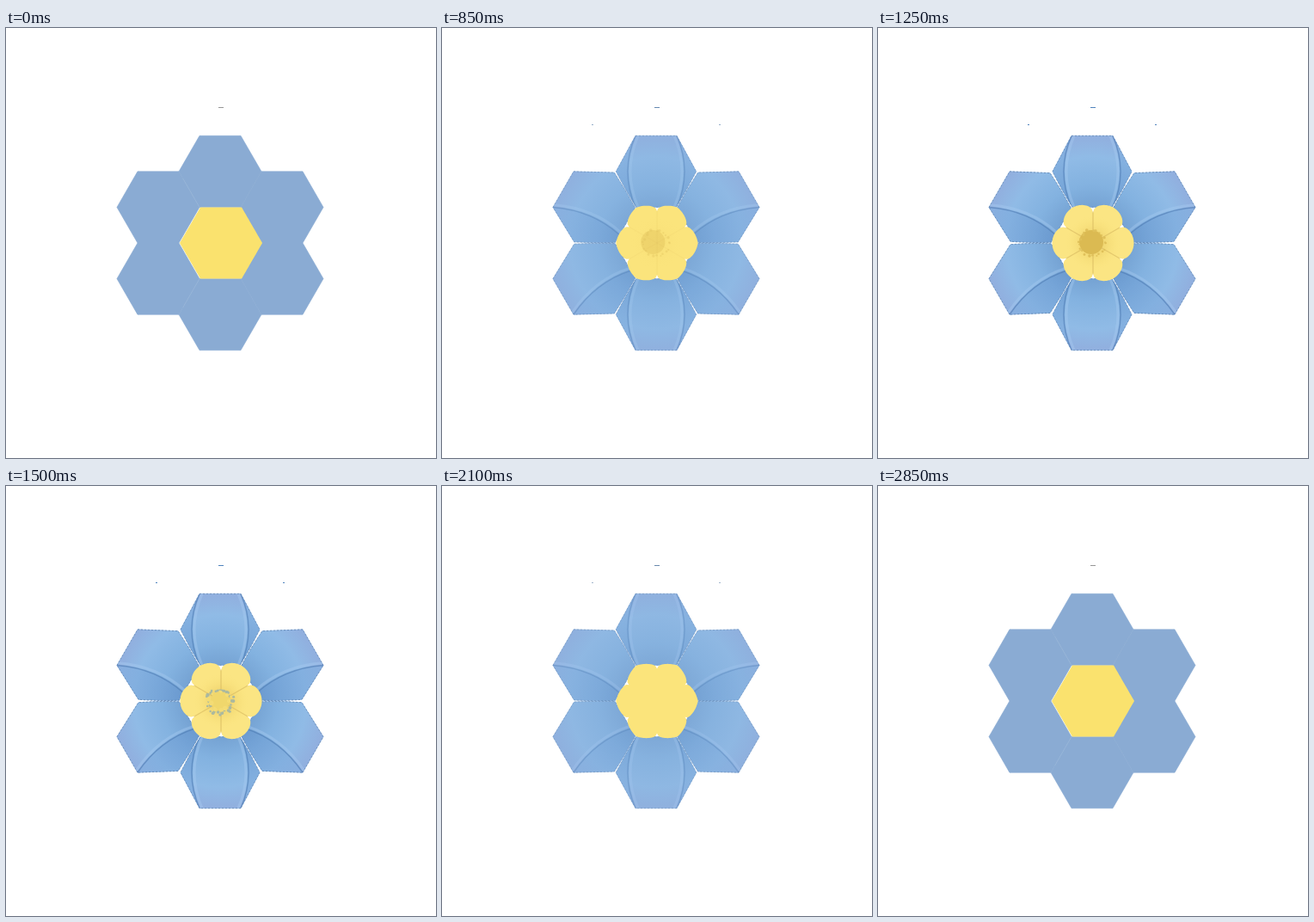
These frames come from a looping animation (500 by 500 pixels, 2.9 s). An HTML page with a canvas:

```html
<!DOCTYPE html>
<html lang="en">
<head>
<meta charset="utf-8">
<title>Hexagon flower</title>
<style>
html, body { margin: 0; width: 100%; height: 100%; overflow: hidden; background: #fff; }
canvas { display: block; }
</style>
</head>
<body>
<canvas id="c" width="500" height="500"></canvas>
<script>
const ctx = document.getElementById('c').getContext('2d');
const LOOP = 2900, STEP = 50;
const R = 48;                       // hexagon corner radius
const H = R * Math.sqrt(3) / 2;     // centre to edge
const TAU = Math.PI * 2, SIXTH = TAU / 6;

const clamp = x => Math.max(0, Math.min(1, x));
const smooth = x => x * x * (3 - 2 * x);
const ramp = (t, a, b) => smooth(clamp((t - a) / (b - a)));
const pulse = (t, a, b, c, d) => ramp(t, a, b) * (1 - ramp(t, c, d));
const mix = (a, b, p) => a + (b - a) * p;
const mixRgb = (a, b, p) => `rgb(${a.map((v, i) => Math.round(mix(v, b[i], p)))})`;

function seeded(seed) {
  return () => (seed = seed * 16807 % 2147483647) / 2147483647;
}

function radial(y, r0, r1, ...cols) {
  const g = ctx.createRadialGradient(0, y, r0, 0, y, r1);
  cols.forEach((col, i) => g.addColorStop(i / (cols.length - 1), col));
  return g;
}

function dot(x, y, r, col) {
  ctx.fillStyle = col;
  ctx.beginPath();
  ctx.arc(x, y, r, 0, TAU);
  ctx.fill();
}

// A petal points up from the flower's centre; opening pulls in its shoulders.
function petalPath(p) {
  const path = new Path2D();
  const shoulder = R - 2 * p, base = R / 2 - p;
  path.moveTo(-R / 2, -3 * H);
  path.lineTo(R / 2, -3 * H);
  path.lineTo(shoulder, -2 * H);
  path.quadraticCurveTo(R * 0.75, -1.5 * H, base, -H);
  path.lineTo(-base, -H);
  path.quadraticCurveTo(-R * 0.75, -1.5 * H, -shoulder, -2 * H);
  path.closePath();
  return path;
}

// A crease runs from an outer corner to the base; the flap beside it is darker.
function crease(side, bend, foot) {
  const line = shift => {
    const path = new Path2D();
    path.moveTo(side * (R / 2 - shift), -3 * H);
    path.quadraticCurveTo(side * (bend - shift), -2 * H, side * (foot - shift), -H);
    return path;
  };
  const flap = new Path2D(line(0));
  flap.lineTo(side * R, -H);
  flap.lineTo(side * R, -3 * H);

  ctx.fillStyle = radial(0, H, 3 * H, 'rgba(98,146,203,.6)', 'rgba(128,174,224,.5)');
  ctx.fill(flap);
  ctx.lineWidth = 3;
  ctx.strokeStyle = 'rgba(168,203,240,.4)';
  ctx.stroke(line(3));
  ctx.lineWidth = 1.5;
  ctx.strokeStyle = 'rgba(76,122,178,.6)';
  ctx.stroke(line(0));
}

function petal(turn, mirror, p) {
  const path = petalPath(p);
  const upright = turn % 3 === 0;
  ctx.save();
  ctx.scale(mirror, 1);
  ctx.rotate(-turn * SIXTH);
  ctx.fillStyle = ctx.strokeStyle = mixRgb([138, 171, 211], [141, 182, 227], p);
  ctx.lineWidth = 0.6;
  ctx.fill(path);
  ctx.stroke(path);

  ctx.save();
  ctx.clip(path);
  ctx.globalAlpha = p;
  ctx.fillStyle = radial(0, H - 6, 3 * H + 8, '#729fd0', '#83b2e0', '#90bbe6', '#91abdc');
  ctx.fillRect(-R, -3 * H, 2 * R, 2 * H);
  if (upright) {
    crease(-1, 42, R / 2);
    crease(1, 42, R / 2);
  } else {
    crease(-1, 4, 13);
  }
  ctx.restore();

  ctx.globalAlpha = 0.6 * p;
  ctx.strokeStyle = '#4a6c96';
  ctx.lineWidth = 0.8;
  ctx.setLineDash([2, 2]);
  ctx.stroke(path);
  ctx.restore();
}

function seams(p) {
  ctx.globalAlpha = 0.35 * (1 - p);
  ctx.strokeStyle = '#a9c1df';
  ctx.lineWidth = 0.9;
  for (const side of [-1, 1]) {
    ctx.beginPath();
    ctx.moveTo(-R / 2, side * H);
    ctx.lineTo(-R * 0.9, side * H * 1.8);
    ctx.stroke();
  }
  ctx.globalAlpha = 1;
}

// Polar outline: a hexagon that turns into six rounded lobes.
function heartPath(p) {
  const path = new Path2D();
  for (let i = 0; i < 180; i++) {
    const a = i / 180 * TAU;
    const hex = H / Math.cos(a % SIXTH - SIXTH / 2);
    const lobes = 35 + 12.5 * Math.abs(Math.cos(3 * a)) ** 0.45;
    const r = mix(hex, lobes, p);
    path.lineTo(r * Math.cos(a), r * Math.sin(a));
  }
  path.closePath();
  return path;
}

function heart(t, p) {
  const path = heartPath(p);
  const detail = pulse(t, 700, 1250, 1550, 1950);
  ctx.save();
  ctx.fillStyle = mixRgb([250, 226, 110], [251, 229, 131], p);
  ctx.fill(path);
  ctx.clip(path);
  ctx.globalAlpha = detail;
  ctx.fillStyle = radial(0, 8, 32, 'rgba(226,194,92,.6)', 'rgba(250,226,120,0)');
  ctx.fillRect(-R, -R, 2 * R, 2 * R);
  ctx.strokeStyle = 'rgba(214,184,96,.6)';
  ctx.lineWidth = 1.4;
  for (let i = 0; i < 6; i++) {
    const a = (i + 0.5) * SIXTH;
    ctx.beginPath();
    ctx.moveTo(0, 0);
    ctx.lineTo(R * Math.cos(a), R * Math.sin(a));
    ctx.stroke();
  }
  ctx.restore();
}

function ring(n, r, spread, size, col) {
  const rand = seeded(n * 97);
  for (let i = 0; i < n; i++) {
    const a = (i + rand()) / n * TAU, d = r + (rand() - 0.5) * spread;
    dot(d * Math.cos(a) - 1, d * Math.sin(a), size * (0.6 + 0.7 * rand()), col);
  }
}

function core(t) {
  const grow = ramp(t, 600, 1250);
  ctx.globalAlpha = pulse(t, 600, 1250, 1300, 1450);
  dot(mix(-6, -2, grow), -1, 14, '#dbba52');
  ring(22, 15, 3, 1.4, '#dfc05a');

  ctx.globalAlpha = pulse(t, 1250, 1400, 1550, 1750);
  ring(30, 14, 5, 1.7, '#abb99f');
  dot(-1, 0, 11, '#f0d76c');
  ring(12, 12, 5, 2.2, '#f4dc74');

  ctx.globalAlpha = pulse(t, 1600, 1750, 1850, 2000);
  ring(6, 13, 6, 1, '#a3a983');
  ctx.globalAlpha = 1;
}

function specks(p) {
  ctx.fillStyle = mixRgb([150, 150, 150], [79, 131, 189], p);
  ctx.fillRect(-3, -158, 6, 1);
  ctx.globalAlpha = p;
  for (const side of [-1, 1]) ctx.fillRect(side * 74 - 2, -138, 2, 1);
  ctx.globalAlpha = 1;
}

function draw(t) {
  const p = smooth(smooth(1 - Math.abs(t / (LOOP / 2) - 1)));
  ctx.setTransform(1, 0, 0, 1, 0, 0);
  ctx.fillStyle = '#fff';
  ctx.fillRect(0, 0, 500, 500);
  ctx.translate(249, 250);
  for (let turn = 0; turn < 4; turn++) {
    petal(turn, 1, p);
    if (turn % 3) petal(turn, -1, p);
  }
  seams(p);
  ctx.translate(1, 0);
  heart(t, p);
  core(t);
  specks(p);
}

const start = performance.now();
function tick() {
  const t = (performance.now() - start) % LOOP;
  draw(Math.floor(t / STEP) * STEP);
  requestAnimationFrame(tick);
}
tick();
</script>
</body>
</html>
```
